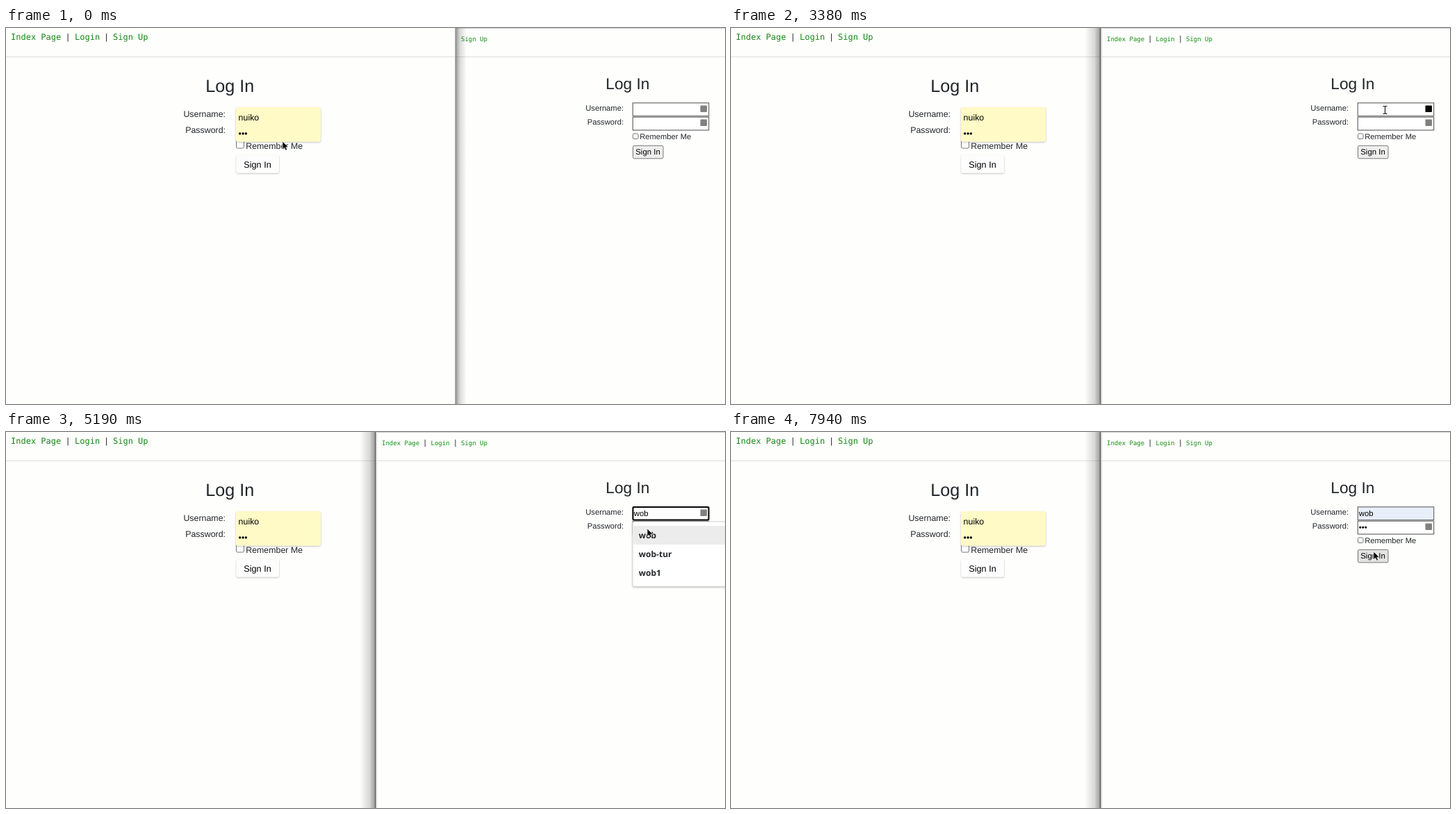
Animation, 1035 px wide and 541 px high, one loop 8 s. Source, as an HTML page:

```html
<!DOCTYPE html>
<html lang="en">
<head>
<meta charset="utf-8">
<title>Log In</title>
<style>
  html, body { margin: 0; width: 100%; height: 100%; overflow: hidden; background: #fefefd; }
  svg { display: block; width: 1035px; height: 541px; }
  text { font-family: "Liberation Sans", Arial, sans-serif; fill: #212529; text-rendering: geometricPrecision; white-space: pre; }
  .left { font-size: 12.4px; }
  .right { font-size: 11.2px; }
  .left .title { font-size: 25.2px; }
  .right .title { font-size: 22.7px; }
  .link { font-family: "DejaVu Sans Mono", monospace; fill: #168716; }
  .left .link { font-size: 12px; }
  .right .link { font-size: 9px; fill: #129012; }
  .end { text-anchor: end; }
  .mid { text-anchor: middle; }
  .ink { fill: #000; }
  .right .ink { font-size: 11.4px; }
  .left .button { font-size: 12.7px; }
  .rule { fill: #dedede; }
  .field { fill: #fff; stroke: #6a6a6a; stroke-width: 1.2; }
  .focus { fill: none; stroke: #050505; stroke-width: 2; }
  .box { fill: #fff; stroke: #767676; }
  .icon { fill: #818181; }
  .icon.hot { fill: #0a0a0a; }
  .item { font: 600 12px "Noto Sans", "Open Sans", sans-serif; fill: #25282b; }
</style>
</head>
<body>
<svg viewBox="0 0 1035 541">
  <defs>
    <clipPath id="pane"><rect id="paneRect" y="0" width="520" height="541"/></clipPath>
    <linearGradient id="fade">
      <stop offset="0" stop-opacity=".38"/>
      <stop offset=".35" stop-opacity=".15"/>
      <stop offset="1" stop-opacity="0"/>
    </linearGradient>
    <filter id="soft" x="-20%" y="-20%" width="140%" height="150%">
      <feDropShadow dx="0" dy="1" stdDeviation="1" flood-opacity=".28"/>
    </filter>
    <path id="arrow" d="M0 0V11.6L2.7 9.1 4.6 13.2 6.6 12.3 4.8 8.3H8.3Z" fill="#050505" stroke="#fff" stroke-width=".7"/>
    <path id="beam" d="M-3-5.5H-1L0-4.8 1-5.5H3M0-4.8V4.8M-3 5.5H-1L0 4.8 1 5.5H3" fill="none" stroke="#111" stroke-width="1.1"/>
    <path id="hand" d="M-2 1Q-2-.5-.5-.5T1 1V4L3 4.2 5 4.8 6.5 6V9L5 12.5H-2.5L-5.6 7.6Q-5.6 6-4 6.2L-2 8Z" fill="#050505" stroke="#fff" stroke-width=".6"/>
  </defs>

  <g class="left">
    <rect width="1035" height="541" fill="#fefefd"/>
    <rect class="rule" y="41" width="1035" height="1"/>
    <text class="link" x="7" y="17">Index Page</text>
    <text class="mid" x="89" y="17">|</text>
    <text class="link" x="99" y="17">Login</text>
    <text class="mid" x="144.5" y="17">|</text>
    <text class="link" x="154" y="17">Sign Up</text>
    <text class="title" x="287.3" y="92">Log In</text>
    <text class="end" x="316" y="128.4">Username:</text>
    <text class="end" x="316" y="151">Password:</text>
    <rect class="box" x="331.5" y="161.5" width="11" height="11.5" rx="2"/>
    <text x="345.2" y="173.6">Remember Me</text>
    <rect x="331" y="114" width="122" height="49.5" rx="2.5" fill="#fffac6" filter="url(#soft)"/>
    <rect data-on="440-3380" x="331.5" y="137.5" width="121" height="26" rx="2" fill="none" stroke="#c4be8c" stroke-dasharray="1 1"/>
    <text class="ink" x="334.6" y="132.6">nuiko</text>
    <text class="ink" x="334.6" y="155.6">•••</text>
    <rect data-on="440-1250 2500-3380" x="347" y="144" width="1" height="14"/>
    <rect x="331.5" y="183" width="61.5" height="25.5" rx="2.5" fill="#fdfdfd" filter="url(#soft)"/>
    <text class="ink button mid" x="362" y="200.8">Sign In</text>
  </g>

  <g class="right" clip-path="url(#pane)">
    <rect x="530" width="505" height="541" fill="#fefefd"/>
    <rect x="530" width="505" height="1" fill="#cfcfcf"/>
    <rect class="rule" x="530" y="41" width="505" height="1"/>
    <text class="link" x="541" y="19">Index Page</text>
    <text class="mid" x="603.2" y="19">|</text>
    <text class="link" x="611.5" y="19">Login</text>
    <text class="mid" x="647" y="19">|</text>
    <text class="link" x="655" y="19">Sign Up</text>
    <text class="title" x="863.3" y="87.6">Log In</text>
    <text class="end" x="889" y="119">Username:</text>
    <text class="end" x="889" y="139.4">Password:</text>

    <rect id="user" class="field" x="902.3" y="107.8" width="109.4" height="18.8"/>
    <rect class="field" x="902.3" y="128.2" width="109.4" height="18.8"/>
    <rect data-on="3440-6250" class="focus" x="902.5" y="108" width="109" height="18.4" rx="2"/>
    <rect data-on="6250-7690" class="focus" x="902.5" y="128.4" width="109" height="18.4" rx="2"/>
    <rect data-on="0-5560" id="userIcon" class="icon" x="999.5" y="111.5" width="9.5" height="9.5" rx="1"/>
    <rect id="passIcon" class="icon" x="999.5" y="131.5" width="9.5" height="9.5" rx="1"/>
    <text id="userText" class="ink" x="903.8" y="120.6"></text>
    <text id="passText" class="ink" x="903.8" y="140.8"></text>
    <rect id="userCaret" data-on="3440-4630 5560-5880" y="110" width="1" height="13"/>
    <rect id="passCaret" data-on="6250-7120" y="131" width="1" height="13"/>

    <rect class="box" x="902.5" y="152" width="7.5" height="7.5" rx="1.5"/>
    <text x="912.2" y="160">Remember Me</text>
    <rect id="button" class="box" x="902.5" y="169.3" width="43.5" height="18.5" rx="2"/>
    <text class="ink mid" x="924" y="182">Sign In</text>

    <g data-on="3880-5560">
      <rect id="list" x="902" y="129" width="150" rx="2" fill="#fff" stroke="#bbb" stroke-width=".6" filter="url(#soft)"/>
      <rect data-on="5060-5560" x="902.5" y="135" width="140" height="27" fill="#ececec"/>
      <g id="items"></g>
    </g>
  </g>

  <g data-on="0-3380">
    <rect x="648" width="15" height="541" fill="url(#fade)"/>
    <rect x="646.5" width="1.5" height="541" fill="#8a8a8a"/>
  </g>
  <g data-on="3380-8000">
    <rect width="22" height="541" fill="url(#fade)" transform="matrix(-1 0 0 1 531 0)"/>
    <rect x="531" width="1.6" height="541" fill="#585858"/>
    <rect x="532.6" width="1.6" height="541" fill="#dcdcdc"/>
  </g>

  <use id="pointer"/>
</svg>
<script>
  const LOOP = 8000, ROW = 27.3;
  const $ = id => document.getElementById(id);

  // Pointer stops: time, shape, x, y
  const stops = [
    [0, 'arrow', 398, 163], [60, 'beam', 418, 163],
    [2190, 'arrow', 397, 171], [2250, 'arrow', 452, 184], [2310, 'arrow', 521, 192],
    [2500, 'arrow', 640, 201], [2560, 'arrow', 752, 183], [2630, 'arrow', 838, 160],
    [2750, 'arrow', 880, 146], [2880, 'beam', 916, 130], [3000, 'beam', 934, 122],
    [3130, 'beam', 941.5, 118],
    [4810, 'arrow', 941, 118], [4880, 'arrow', 941, 119], [4940, 'arrow', 938, 126],
    [5060, 'arrow', 929, 136], [5190, 'arrow', 923, 139],
    [5880, 'beam', 934, 143], [5940, 'beam', 945.5, 146.5],
    [7060, 'arrow', 943, 151], [7120, 'arrow', 939, 155], [7190, 'arrow', 933, 159],
    [7250, 'hand', 928, 164], [7380, 'hand', 926, 169], [7500, 'hand', 925, 172],
    [7940, 'arrow', 925, 172]
  ];
  const userTyped = [[0, ''], [3880, 'w'], [3940, 'wo'], [4060, 'wob']];
  const passTyped = [[0, ''], [6310, '•'], [6370, '••'], [6500, '•••']];
  const fills = [[0, '#efefef'], [7250, '#e3e3e3'], [7690, '#f5f5f5'], [7880, '#e3e3e3']];

  const names = ['wob', 'wob-tur', 'wob1', 'wistel', 'wuno', 'wadro'];
  const items = names.map((name, i) => {
    const el = document.createElementNS('http://www.w3.org/2000/svg', 'text');
    el.setAttribute('class', 'item');
    el.setAttribute('x', 910.8);
    el.setAttribute('y', 152.7 + i * ROW);
    el.textContent = name;
    $('items').append(el);
    return el;
  });

  const timed = [...document.querySelectorAll('[data-on]')].map(el => ({
    el, spans: el.dataset.on.split(' ').map(s => s.split('-').map(Number))
  }));
  const within = (t, a, b) => t >= a && t < b;
  const at = (list, t) => list.findLast(step => step[0] <= t);

  function type(id, list, t) {
    const text = $(id + 'Text'), value = at(list, t)[1];
    if (text.textContent !== value) text.textContent = value;
    const width = value ? text.getComputedTextLength() : 0;
    $(id + 'Caret').setAttribute('x', Math.round(904.4 + width));
    return value;
  }

  function draw(t) {
    for (const { el, spans } of timed)
      el.style.display = spans.some(([a, b]) => within(t, a, b)) ? '' : 'none';

    $('paneRect').setAttribute('x', t < 3380 ? 647 : 532);
    $('user').style.fill = t < 5560 ? '#fff' : '#e8eefa';
    $('userIcon').classList.toggle('hot', within(t, 3000, 4810));
    $('passIcon').classList.toggle('hot', within(t, 5880, 7060));
    $('button').style.fill = at(fills, t)[1];

    const prefix = type('user', userTyped, t);
    type('pass', passTyped, t);
    const shown = names.filter(name => name.startsWith(prefix)).length;
    items.forEach((el, i) => el.style.display = i < shown ? '' : 'none');
    $('list').setAttribute('height', 11.4 + shown * ROW);

    const [, shape, x, y] = at(stops, t);
    $('pointer').setAttribute('href', '#' + shape);
    $('pointer').setAttribute('transform', `translate(${x} ${y})`);
  }

  const start = performance.now();
  function tick() {
    draw((performance.now() - start) % LOOP);
    requestAnimationFrame(tick);
  }
  tick();
</script>
</body>
</html>
```
